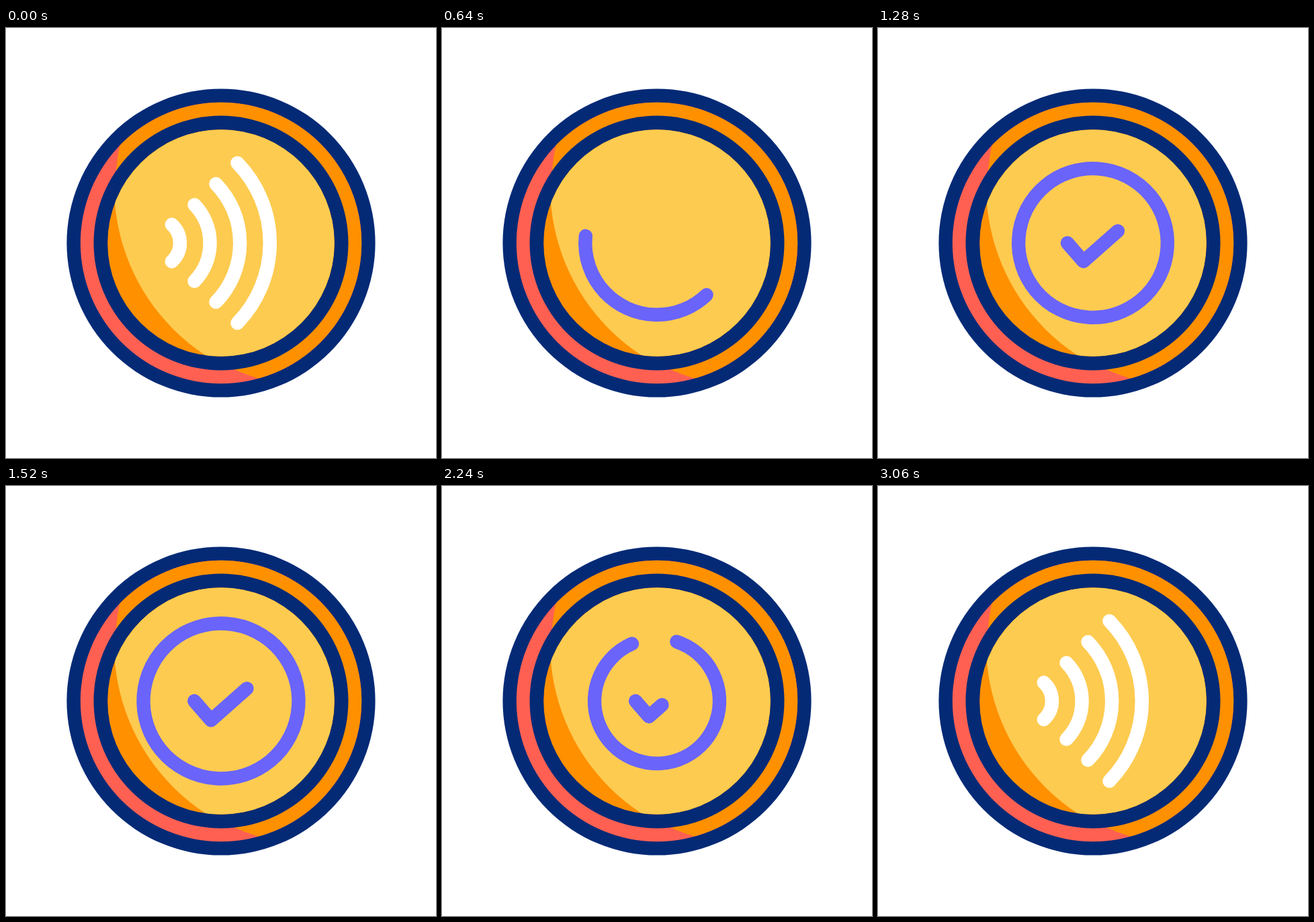
An HTML page with a canvas that plays this animation: 640x640 px, repeating every 3.6 s.

```html
<!DOCTYPE html>
<html>
<head>
<meta charset="utf-8">
<style>
html, body { margin: 0; width: 100%; height: 100%; overflow: hidden; background: #fff; }
canvas { display: block; width: 640px; height: 640px; }
</style>
</head>
<body>
<canvas id="stage"></canvas>
<script>
const LOOP = 3600, C = 320, REST = 93, SEAM = 252;
const NAVY = '#042a76', ORANGE = '#ff9000', CORAL = '#ff6052',
      YELLOW = '#fdcb50', PURPLE = '#6a64fb', WHITE = '#fff';

const stage = document.getElementById('stage');
const dpr = window.devicePixelRatio || 1;
stage.width = stage.height = 640 * dpr;
const ctx = stage.getContext('2d');
ctx.scale(dpr, dpr);
ctx.lineWidth = 20.4;
ctx.lineCap = ctx.lineJoin = 'round';

const clamp = x => Math.min(1, Math.max(0, x));

// Smooth progress from 0 to 1 between two times.
function ease(t, from, to) {
  const x = clamp((t - from) / (to - from));
  return x * x * (3 - 2 * x);
}

function circle(x, y, r, color) {
  ctx.fillStyle = color;
  ctx.beginPath();
  ctx.arc(x, y, r, 0, 7);
  ctx.fill();
}

function arc(x, r, from, length, color) {
  if (length < 0.5) return;
  const rad = Math.PI / 180;
  ctx.strokeStyle = color;
  ctx.beginPath();
  ctx.arc(x, C, r, from * rad, (from + length) * rad);
  ctx.stroke();
}

// A disc whose light side is cut out by one large circle.
function shaded(r, dark, light, lightRadius) {
  circle(C, C, r, dark);
  ctx.save();
  ctx.clip();
  circle(461, 236, lightRadius, light);
  ctx.restore();
}

function coin() {
  circle(C, C, 229.6, NAVY);
  shaded(209.2, CORAL, ORANGE, 298);
  circle(C, C, 189.5, NAVY);
  shaded(168.8, ORANGE, YELLOW, 300);
}

function waves(t) {
  for (let i = 0; i < 4; i++) {
    const delay = i * 60;
    const shown = 1 - ease(t, 20 + delay, 300 + delay) + ease(t, 2580 + delay, 2880 + delay);
    const half = (i ? 44.2 : 48) * shown;
    arc(222, 37 + 44.6 * i, -half, 2 * half, WHITE);
  }
}

// The ring turns once while it is drawn, and once more while it is erased.
function ring(t, r) {
  const turns = ease(t, 270, 1090) + ease(t, 2120, 2735);
  const shown = ease(t, 290, 1118) - ease(t, 2120, 2690);
  arc(C, r, SEAM + 360 * turns, 360 * shown, PURPLE);
}

function check(t, scale) {
  const shown = ease(t, 800, 1200) - ease(t, 2120, 2420);
  if (shown < 0.01) return;
  const bend = 0.347;
  const a = clamp(shown / bend), b = clamp((shown - bend) / (1 - bend));
  const line = (x, y) => ctx.lineTo(C + x * scale, C + y * scale);
  ctx.strokeStyle = PURPLE;
  ctx.beginPath();
  line(-32, 0);
  line(-32 + 20 * a, 23 * a);
  if (b) line(-12 + 43 * b, 23 - 38 * b);
  ctx.stroke();
}

function draw(t) {
  ctx.fillStyle = WHITE;
  ctx.fillRect(0, 0, 640, 640);
  coin();
  waves(t);
  const scale = 1.148 + 0.094 * ease(t, 1080, 1500) - 0.242 * ease(t, 1520, 1820);
  ring(t, REST * scale);
  check(t, scale);
}

const start = performance.now();
function loop() {
  draw((performance.now() - start) % LOOP);
  requestAnimationFrame(loop);
}
loop();
</script>
</body>
</html>
```
